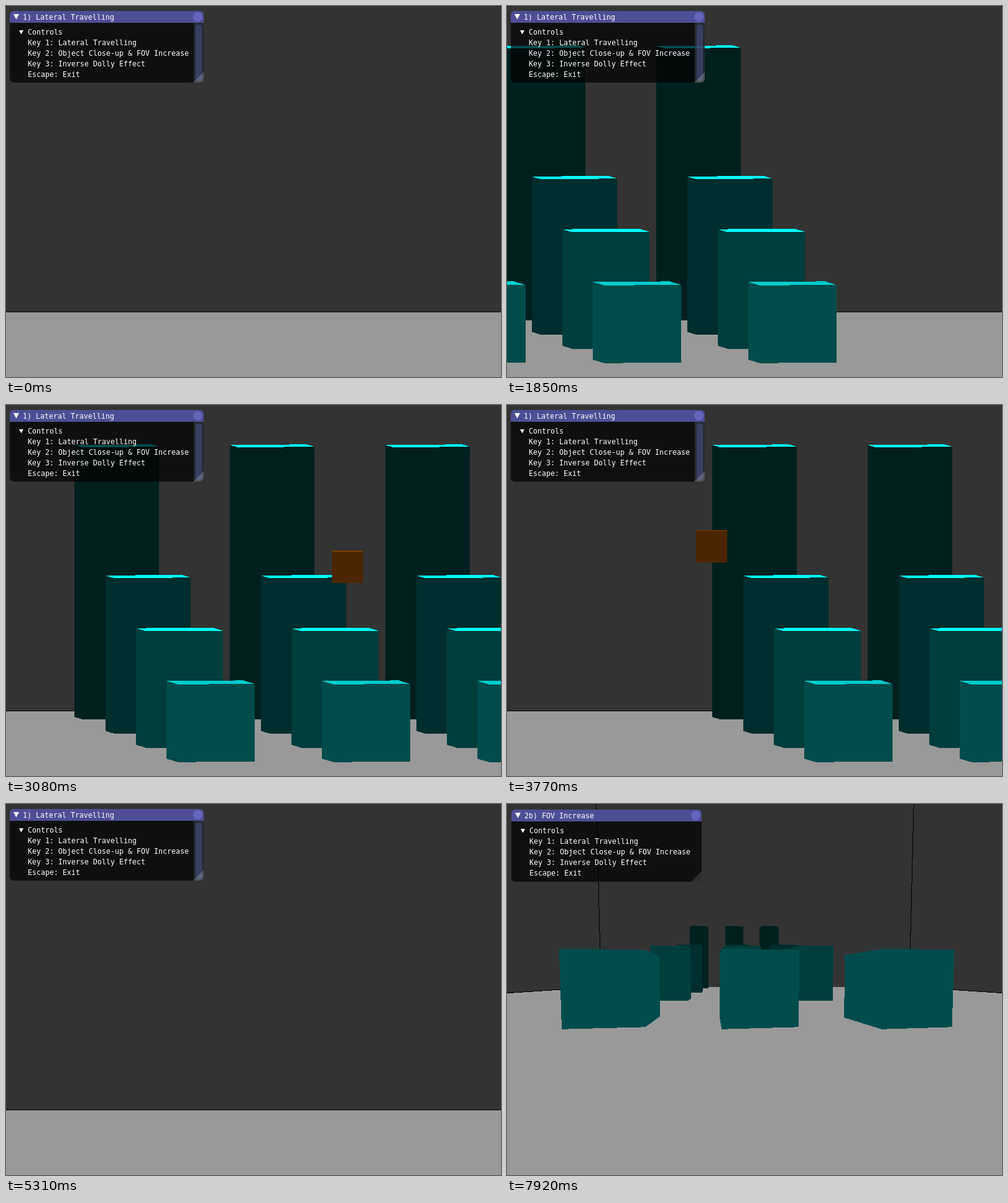
Write an HTML page that moves like this. It is 796 px wide and 596 px high and loops after 8000 ms.

```html
<!DOCTYPE html>
<html lang="en">
<head>
<meta charset="utf-8">
<title>Camera moves</title>
<style>
  html, body { margin: 0; width: 100%; height: 100%; overflow: hidden; background: #333; }
  svg { display: block; }
  #scene { shape-rendering: crispEdges; }
  text { font: 11.63px "DejaVu Sans Mono", monospace; fill: #fff; white-space: pre; }
</style>
</head>
<body>
<svg width="796" height="596" viewBox="0 0 796 596"><g id="scene"></g><g id="panel"></g></svg>
<script>
const LOOP = 8000, FPS = 13;
const CLOSE_UP = 74, FOV_UP = 96, LAST = 103;
const UNIT = 125, PITCH = 0.0452, YAW = 0.15, STAGGER = 0.402;
const sinP = Math.sin(PITCH), cosP = Math.cos(PITCH);

// Back to front: row index, height, depth, side colour, top colour
const rows = [
  { i: 3, h: 3.5, depth: 0.69, side: '#00201f', top: '#0ff' },
  { i: 2, h: 2, depth: 0.77, side: '#002d2d', top: '#0ff' },
  { i: 1, h: 1.5, depth: 0.86, side: '#003d3d', top: '#0ff' },
  { i: 0, h: 1, depth: 1, side: '#004c4c', top: '#0cc' }
];

const scene = document.getElementById('scene');
const panel = document.getElementById('panel');

const rect = (x, y, w, h, fill, extra = '') =>
  `<rect x="${x}" y="${y}" width="${w}" height="${h}" fill="${fill}" ${extra}/>`;
const poly = (pts, fill) =>
  `<polygon points="${pts.map(p => p.map(v => v.toFixed(2))).join(' ')}" fill="${fill}"/>`;
const line = (a, b) =>
  `<line x1="${a[0]}" y1="${a[1]}" x2="${b[0]}" y2="${b[1]}" stroke="#000"/>`;
const label = (x, y, s) => `<text x="${x}" y="${y}">${s}</text>`;

// One yawed block; project maps (x, height, depth) to the screen
function block(row, col, project, withTop) {
  const c = Math.cos(YAW) / 2, s = Math.sin(YAW) / 2;
  const x0 = col * 2 - row.i * STAGGER, z0 = row.i * 4;
  const corners = [[-1, -1], [1, -1], [1, 1], [-1, 1]].map(([a, b]) =>
    [x0 + a * c - b * s * row.depth, z0 + a * s + b * c * row.depth]);
  const low = corners.map(([x, z]) => project(x, 0, z));
  const high = corners.map(([x, z]) => project(x, row.h, z));
  let out = '';
  for (const i of [2, 1, 3, 0]) {
    const j = (i + 1) % 4;
    out += poly([low[i], low[j], high[j], high[i]], row.side);
  }
  return withTop ? out + poly(high, row.top) : out;
}

const blocks = (project, withTop) => rows.map(row =>
  [-1, 0, 1].map(col => block(row, col, project, withTop)).join('')).join('');

function lateral(k) {
  // Ten pixels per tick, 30 ticks a second, with two skipped ticks
  const n = Math.ceil(k * 30 / FPS) + (k >= 48) + (k >= 57);
  const mid = 49 + 10 * (n - 40);
  const project = (x, y, z) =>
    [mid + UNIT * x, 570.5 - UNIT * (y * cosP + z * sinP)];
  let out = rect(0, 0, 796, 596, '#333') + rect(0, 491, 796, 1, '#000') +
    rect(0, 492, 796, 104, '#999') + blocks(project, true);
  if (n >= 66 && k < 58) {
    const x = 754 - 10 * (n - 70);
    const rise = (n - 70) / 23;
    const y = Math.round(268 - 34 * rise);
    out += rect(x, y, 50, 52, '#4c2600') +
      rect(x, y, 50, Math.max(1, Math.round(3 - rise)), '#7f3f00');
  }
  return out;
}

function perspective(k) {
  const dist = Math.max(4, 4.387 - 0.043 * (k - 86));
  const eye = 0.652 + PITCH * (dist - 4);
  const fov = k < FOV_UP ? 64.5 : 67.7 - 2.61 * (LAST - k);
  const focal = 298 / Math.tan(fov * Math.PI / 360);
  const project = (x, y, z) => {
    const up = y - eye, far = z + dist;
    const zc = far * cosP - up * sinP;
    return [399 + focal * x / zc, 298 - focal * (up * cosP + far * sinP) / zc];
  };
  const side = 10.1, back = 14.1, near = 1 - dist;
  const [bl, br, nl, nr] = [[-side, back], [side, back], [-side, near], [side, near]]
    .map(([x, z]) => project(x, 0, z));
  return rect(0, 0, 796, 596, '#333') +
    poly([bl, br, nr, [nr[0], 6000], [nl[0], 6000], nl], '#999') +
    line(bl, project(-side, 14, back)) + line(br, project(side, 14, back)) +
    line(bl, nl) + line(br, nr) + blocks(project, false);
}

function drawPanel(title, x, y, w, h, scroll) {
  const r = x + w, b = y + h, tx = x - 6, ty = y - 8;
  let out = `<path d="M${x} ${y + 19}H${r}V${b - 7}Q${r} ${b} ${r - 7} ${b}H${x + 7}Q${x} ${b} ${x} ${b - 7}Z" fill="#000" fill-opacity=".7"/>` +
    `<path d="M${x} ${y + 19}V${y + 7}Q${x} ${y} ${x + 7} ${y}H${r - 7}Q${r} ${y} ${r} ${y + 7}V${y + 19}Z" fill="#5252a1" fill-opacity=".9"/>`;
  if (scroll) {
    out += `<path d="M${r - 16} ${y + 19}H${r}V${b - 7}Q${r} ${b} ${r - 7} ${b}H${r - 16}Z" fill="#33404d" fill-opacity=".6"/>` +
      rect(r - 13, y + 22, 10, h - 25, '#6666cc', 'fill-opacity=".3" rx="4"');
  }
  out += `<path d="M${r} ${b - 17}V${b - 7}Q${r} ${b} ${r - 7} ${b}H${r - 17}Z" fill="#fff" fill-opacity="${scroll ? 0.2 : 0.13}"/>` +
    `<circle cx="${r - 9.5}" cy="${y + 9.5}" r="7.5" fill="#6565bd"/>` +
    poly([[12 + tx, 13 + ty], [21 + tx, 13 + ty], [16.5 + tx, 21.5 + ty]], '#fff') +
    poly([[21 + tx, 39 + ty], [28 + tx, 39 + ty], [24.5 + tx, 45.5 + ty]], '#fff') +
    label(27 + tx, 22 + ty, title);
  ['Controls', 'Key 1: Lateral Travelling', 'Key 2: Object Close-up &amp; FOV Increase',
    'Key 3: Inverse Dolly Effect', 'Escape: Exit'].forEach((s, i) => {
    out += label(35 + tx, 46 + ty + 17 * i, s);
  });
  return out;
}

const panels = [
  drawPanel('1) Lateral Travelling', 6, 8, 312, 115, true),
  drawPanel('2a) Object Close-up', 6, 9, 312, 113, true),
  drawPanel('2b) FOV Increase', 7, 9, 306, 116, false)
];

let shown = -1, shownMode = -1;
function tick() {
  const t = performance.now() % LOOP;
  const k = Math.min(LAST, Math.floor((t + 5) * FPS / 1000));
  if (k !== shown) {
    shown = k;
    scene.innerHTML = k < CLOSE_UP ? lateral(k) : perspective(k);
    const mode = (k >= CLOSE_UP) + (k >= FOV_UP);
    if (mode !== shownMode) panel.innerHTML = panels[shownMode = mode];
  }
  requestAnimationFrame(tick);
}
tick();
</script>
</body>
</html>
```
